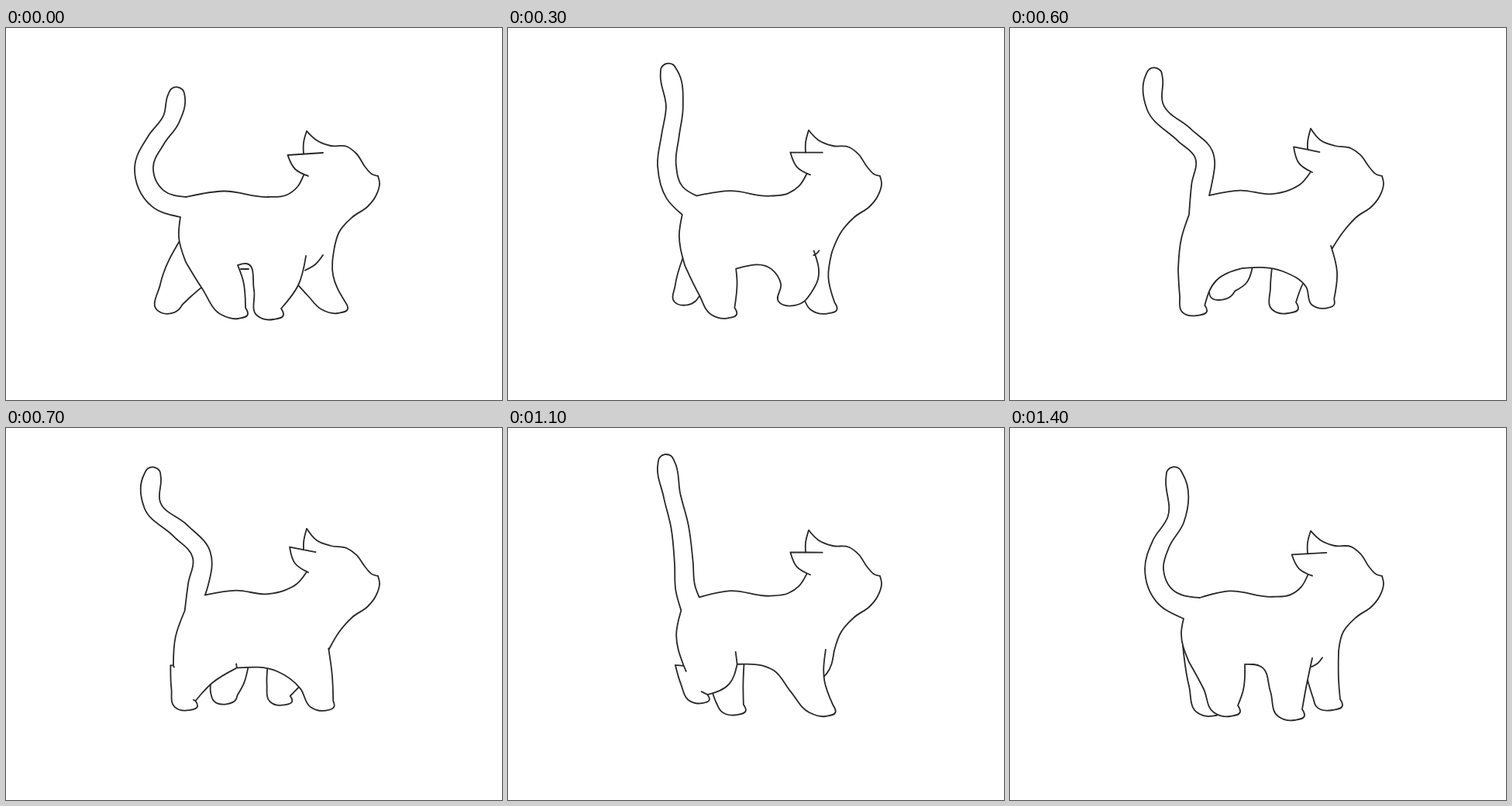
An HTML page that plays this animation: 640x480 px, repeating every 1500 ms.

```html
<!DOCTYPE html>
<html lang="en">
<head>
<meta charset="utf-8">
<title>Walking cat</title>
<style>
  html, body { margin: 0; width: 100%; height: 100%; overflow: hidden; background: #fff; }
  svg { display: block; width: 100vw; height: 100vh; }
  path { fill: none; stroke: #282828; stroke-width: 1.8; stroke-linecap: round; stroke-linejoin: round; }
  .far { fill: #fff; }
  .mask { fill: #fff; stroke: none; }
</style>
</head>
<body>
<svg id="stage" viewBox="0 0 640 480"></svg>
<script>
const STEP = 100, STEPS = 15;

// A pose is a skeleton; the outline is built from it.
//   mood: head lift, hind fold, armpit crease    base: rump, loin, breast
//   tail: centre line    legs: top, knee, paw, (paw size, roundness), then up the back
const poses = [
  { at: 0, mood: [0, 0, 1.1], base: "225,244 232,218 424,282",
    tail: "196,220 178,180 194,144 213,118 220,87",
    front: "387,294 377,332 341,373 1,0 320,338 310,304",
    hind: "299,306 306,326 295,372 1,0 253,336 232,302 223,270",
    farFront: "424,282 422,319 424,365 1,0 390,346 372,326",
    farHind: "258,330 238,347 209,366 .8,1 199,331 228,268" },
  { at: 2, mood: [.2, 0, .7], base: "223,246 236,217 422,281",
    tail: "206,217 194,178 200,142 216,111 215,72",
    front: "390,293 384,334 348,361 1,1 338,330 329,308",
    hind: "300,306 303,325 291,372 1,0 253,341 229,299 221,265",
    farFront: "422,281 421,318 423,365 1,0 393,351 376,330",
    farHind: "260,333 246,349 218,366 .8,1 209,336 226,275" },
  { at: 4, mood: [2, 0, 0], base: "227,236 251,216 414,297",
    tail: "225,208 217,176 219,135 212,94 199,43",
    front: "400,282 416,314 385,350 1,1 366,331 350,314",
    hind: "289,315 287,330 265,371 .95,0 239,347 227,314 221,268",
    farFront: "414,297 404,325 390,366 1,0 364,338 354,317",
    farHind: "297,312 294,328 240,344 .8,1 224,328 230,312" },
  { at: 6, mood: [3.2, 0, 0], base: "231,241 257,216 416,284",
    tail: "247,203 250,163 225,138 187,101 186,62",
    front: "414,281 422,315 404,359 .85,.3 382,334 352,314",
    hind: "300,310 266,326 238,368 .95,0 219,345 217,312 221,272",
    farFront: "416,284 376,334 355,365 1,0 336,335 338,309",
    farHind: "313,308 305,329 272,348 .8,1 257,339 264,325" },
  { at: 9, mood: [2.8, 1, 0], base: "229,225 255,215 418,291",
    tail: "245,202 250,166 224,121 197,94 198,56",
    front: "418,291 417,330 414,367 1,0 372,340 345,314",
    hind: "292,309 272,334 226,349 .7,0 206,320 205,295 214,265",
    farFront: "418,291 395,325 362,334 .5,0 344,322 341,310",
    farHind: "309,308 309,330 298,365 .9,0 274,347 262,322" },
  { at: 12, mood: [.3, .9, 0], base: "221,241 243,220 422,287",
    tail: "220,210 214,178 219,132 218,86 207,41",
    front: "405,284 403,325 399,370 1,0 360,340 341,312",
    hind: "298,303 292,329 258,356 .85,0 233,337 222,311 219,268",
    farFront: "422,287 418,315 398,338 .5,0 385,325 384,310",
    farHind: "301,300 299,332 285,368 .95,0 264,357 262,345" },
  { at: 14, mood: [.2, 0, .65], base: "224,246 245,219 424,288",
    tail: "198,215 186,182 195,149 214,118 212,61",
    front: "390,297 382,335 363,374 1,0 336,340 324,308",
    hind: "303,305 301,338 280,369 1,0 250,337 231,302 221,264",
    farFront: "424,288 424,325 412,361 1,0 391,348 383,322",
    farHind: "272,340 274,355 257,369 .9,0 231,333 222,270" }
];

const names = Object.keys(poses[0]).filter(k => k !== "at");
const parse = s => s.split(" ").map(p => p.split(",").map(Number));
for (const p of poses) for (const k of names) p[k] = k === "mood" ? [p[k]] : parse(p[k]);

const svg = document.getElementById("stage");
const layer = cls => {
  const el = document.createElementNS("http://www.w3.org/2000/svg", "path");
  if (cls) el.setAttribute("class", cls);
  return svg.appendChild(el);
};
const farHind = layer("far"), farFront = layer("far"), mask = layer("mask"), lines = layer();

const add = (p, q, k = 1) => [p[0] + q[0] * k, p[1] + q[1] * k];
const unit = p => { const l = Math.hypot(...p) || 1; return [p[0] / l, p[1] / l]; };

// Unit tangents of a smooth line through the points.
function tangents(pts) {
  const n = pts.length, d = [], s = [], v = [];
  for (let i = 0; i < n - 1; i++) {
    const step = add(pts[i + 1], pts[i], -1);
    d[i] = Math.hypot(...step);
    s[i] = unit(step);
  }
  for (let i = 1; i < n - 1; i++)
    v[i] = unit([0, 1].map(c => s[i - 1][c] * d[i] + s[i][c] * d[i - 1]));
  const end = (a, b) => b ? unit(add(a, add(a, b, -1), 0.5)) : a;
  const first = end(s[0], v[1]), last = end(s[n - 2], v[n - 2]);
  v[0] = first;
  v[n - 1] = last;
  return { v, d };
}

function curve(pts, start = "M") {
  const { v, d } = tangents(pts), txt = p => p.map(x => x.toFixed(2)).join(" ");
  return start + txt(pts[0]) + d.map((len, i) => {
    const h = len * 0.35, q = pts[i + 1];
    return `C${txt(add(pts[i], v[i], h))} ${txt(add(q, v[i + 1], -h))} ${txt(q)}`;
  }).join("");
}

// A tapering tube around the centre line, with a round tip.
function tailPoints(spine, rump, loin) {
  const root = [(rump[0] + loin[0]) / 2, (rump[1] + loin[1]) / 2];
  const dirs = tangents([root, ...spine]).v.slice(1), left = [], right = [], tip = [];
  const at = (i, turn) => {
    const r = 10.8 + 2 * (1 - i / 4) ** 2, [x, y] = dirs[i], c = Math.cos(turn), s = Math.sin(turn);
    return add(spine[i], [x * c - y * s, x * s + y * c], r);
  };
  const q = Math.PI / 2;
  spine.forEach((_, i) => {
    left.push(at(i, -q));
    right.unshift(at(i, q));
  });
  for (const a of [-0.5, 0, 0.5]) tip.push(at(4, a * q));
  return [rump, ...left, ...tip, ...right, loin];
}

// Front edge down to the ankle, then round the paw and up the back edge.
function leg([top, knee, paw, [size, round], ...rest]) {
  const at = (x, y) => add(paw, [x, y], size);
  const ankle = at(14 + 9 * round, -11);
  return { down: [top, knee, ankle], up: [ankle, at(17, -3), at(4, 3), at(-17, -2), ...rest] };
}

// Blend neighbouring poses along gentle arcs.
function poseAt(step) {
  const n = poses.length;
  let i = n - 1;
  while (poses[i].at > step) i--;
  const near = [-1, 0, 1, 2].map(o => poses[(i + o + n) % n]);
  const [t0, t1, t2, t3] = near.map((p, o) => p.at + Math.floor((i + o - 1) / n) * STEPS);
  const w = t2 - t1, u = (step - t1) / w;
  const mix = (a, b, c, d) => {
    const q = c - b;
    const m1 = (w * (c - a) / (t2 - t0) + q) / 2, m2 = (w * (d - b) / (t3 - t1) + q) / 2;
    return b + u * (m1 + u * (3 * q - 2 * m1 - m2 + u * (m1 + m2 - 2 * q)));
  };
  const out = {};
  for (const k of names)
    out[k] = near[1][k].map((p, a) => p.map((_, c) => mix(...near.map(o => o[k][a][c]))));
  return out;
}

function draw(step) {
  const p = poseAt(step), [[lift, fold, crease]] = p.mood, [rump, loin, breast] = p.base;
  const front = leg(p.front), hind = leg(p.hind.slice(0, 5));
  const [hock, hip] = p.hind.slice(5), groin = p.hind[0], pit = p.front[0], arch = p.front[5];
  const thigh = add(hock, [11, 1], fold);
  hind.up.push(hock);
  front.up.push(groin);

  const chest = [[480, 191], [482, 200], [477, 217], [467, 230], [447, 244], [430, 263], breast];
  const back = [loin, [281 + 5 * lift, 210.5 - 0.3 * lift], [338, 218 - 1.2 * lift],
    [362 - 0.5 * lift, 215.5 - 2 * lift], [376 - 0.5 * lift, 205 - lift], [384 + lift, 190 - lift]];
  const earTip = [363.5 + 0.8 * lift, 164 - 3.3 * lift], peak = [388, 133 - lift];
  const ear = [[390, 191 - 1.5 * lift], [373, 182 - 2.3 * lift], earTip];
  const farEar = [[384, 163 - 2 * lift], [384, 148], peak];
  const face = [peak, [401, 145], [419, 152], [440, 153 + 0.7 * lift], [452, 162 + 0.5 * lift],
    [464, 180], [473, 189], chest[0]];

  const legs = [front.down, front.up, hind.down, hind.up, [hock, thigh], [thigh, hip, rump]];
  const marks = [[earTip, [409 - 3 * lift, 161 - 0.3 * lift]]];
  const tick = (from, offset, k) => k > 0.1 && marks.push([from, add(from, offset, k)]);
  tick(thigh, [3, 7], fold);
  tick(hind.up[0], [-8, -4], fold);
  tick(groin, [-2, -16], fold);
  if (crease > 0.1)
    marks.push([[20, -1], [11, 10], [-1, 17]].map(o => add(pit, o, crease)));
  // The far flank shows while the near legs pass close together.
  const gap = arch[0] - groin[0];
  if (gap < 16) marks.push([add(groin, [4, 5]), add(groin, [gap + 3, 5])]);

  const far = pts => { const l = leg(pts); return curve(l.down) + curve(l.up, "L"); };
  farHind.setAttribute("d", far(p.farHind));
  farFront.setAttribute("d", far(p.farFront));
  mask.setAttribute("d", curve(chest) + legs.map(r => curve(r, "L")).join("") + "Z");
  lines.setAttribute("d", [tailPoints(p.tail, rump, loin), back, ear, farEar, face, chest, ...legs, ...marks]
    .map(r => curve(r)).join(""));
}

let shown = -1;
function frame() {
  const step = Math.floor(performance.now() / STEP) % STEPS;
  if (step !== shown) draw(shown = step);
  requestAnimationFrame(frame);
}
frame();
</script>
</body>
</html>
```
